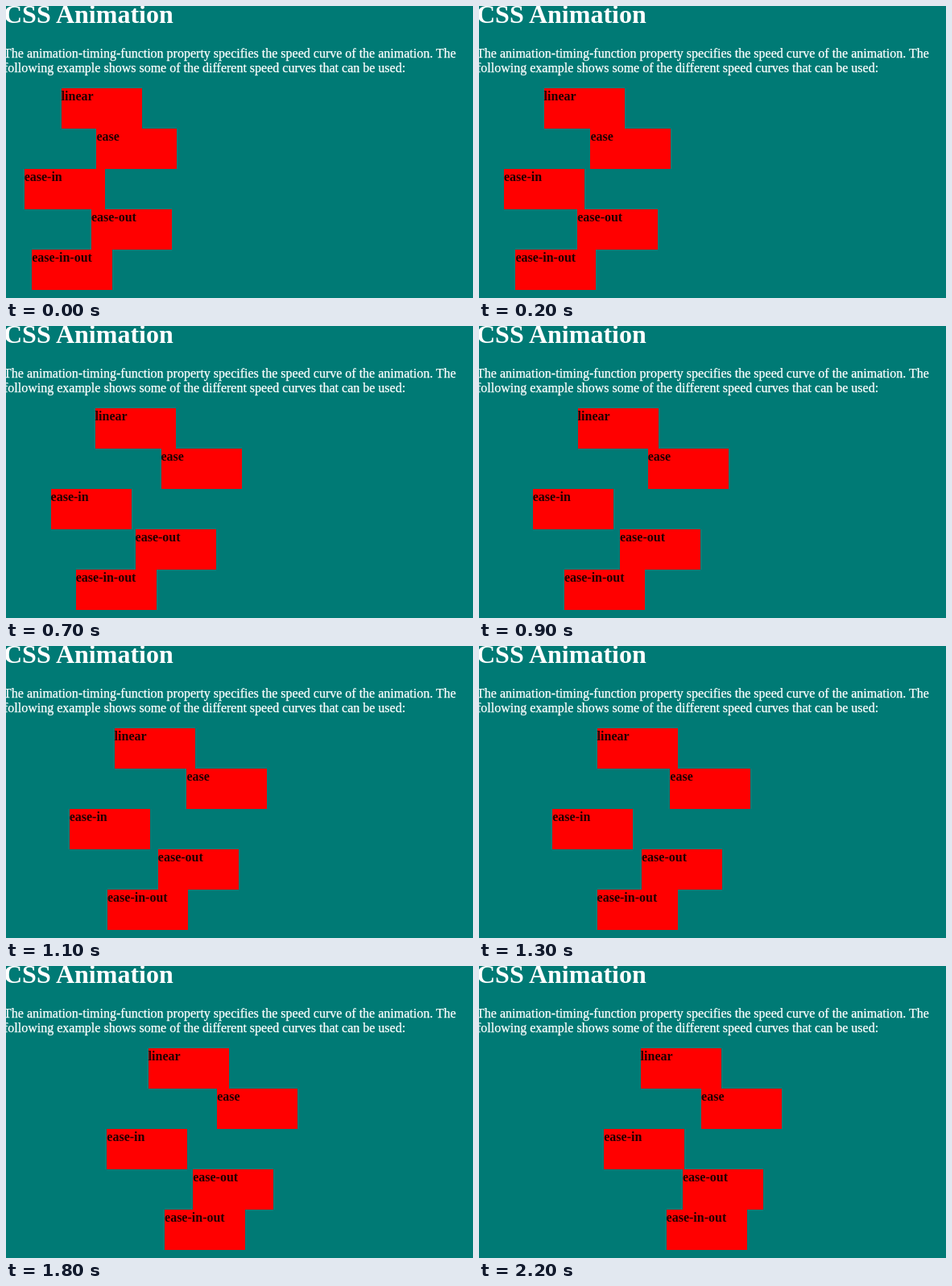
Animation, 580 px wide and 362 px high, one loop 2.3 s. Source, as an HTML page:

```html
<!DOCTYPE html>
<html lang="en">
<head>
<meta charset="utf-8">
<title>CSS Animation</title>
<style>
  html, body {
    margin: 0;
    width: 100%;
    height: 100%;
    overflow: hidden;
    background: #007a75;
  }
  body {
    position: relative;
    font: 16px/18px "Liberation Serif", "Times New Roman", serif;
    color: #fff;
  }
  /* Slightly soft edges, as in a screen recording */
  h1, p, .track { filter: blur(.4px); }
  h1, p {
    position: absolute;
    left: -3px;
    margin: 0;
    white-space: nowrap;
  }
  h1 { top: -8px; font-size: 32px; line-height: 36px; }
  p { top: 50px; -webkit-text-stroke: .25px; }
  .track { position: absolute; left: -3px; top: 102px; }
  .track div {
    position: relative;
    margin-left: -.4px;
    width: 100px;
    height: 50px;
    background: #f00;
    color: #200;
    font-weight: bold;
    line-height: 20px;
    white-space: nowrap;
    animation: slide 5s infinite paused;
  }
  .track .linear { animation-timing-function: linear; }
  .track .ease { animation-timing-function: ease; }
  .track .ease-in { animation-timing-function: ease-in; }
  .track .ease-out { animation-timing-function: ease-out; }
  .track .ease-in-out { animation-timing-function: ease-in-out; }
  @keyframes slide {
    from { left: 0; }
    to { left: 300px; }
  }
</style>
</head>
<body>
<h1>CSS Animation</h1>
<p>The animation-timing-function property specifies the speed curve of the animation. The<br>following example shows some of the different speed curves that can be used:</p>
<div class="track">
  <div class="linear">linear</div>
  <div class="ease">ease</div>
  <div class="ease-in">ease-in</div>
  <div class="ease-out">ease-out</div>
  <div class="ease-in-out">ease-in-out</div>
</div>
<script>
  // The loop shows a 2.3 s stretch of the 5 s slide, in 100 ms steps.
  const LOOP = 2300, STEP = 100, OFFSET = 1200;
  const slides = document.getAnimations();
  let start;

  function draw(now) {
    start ??= now;
    const t = Math.floor(((now - start) % LOOP) / STEP) * STEP;
    for (const slide of slides) slide.currentTime = OFFSET + t;
    requestAnimationFrame(draw);
  }
  requestAnimationFrame(draw);
</script>
</body>
</html>
```
